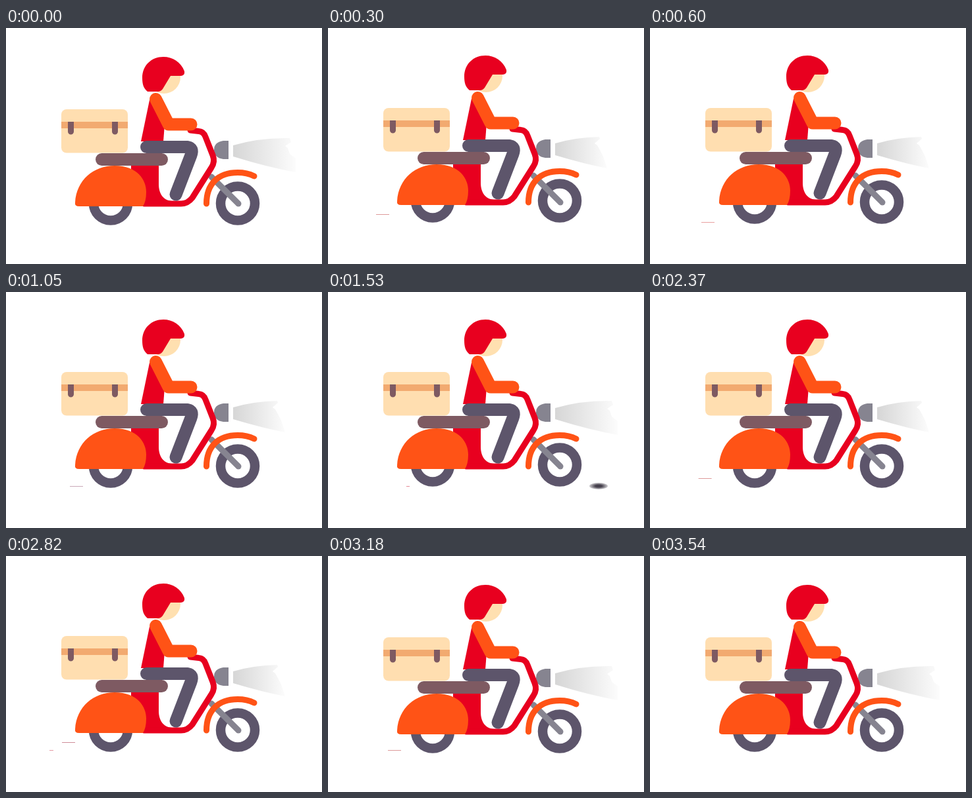
Write an HTML page that moves like this. It is 480x360 px and loops after 3.57 s.

```html
<!DOCTYPE html>
<html lang="en">
<head>
<meta charset="utf-8">
<title>Delivery scooter</title>
<style>
  html, body { margin: 0; width: 100%; height: 100%; overflow: hidden; background: #fff; }
  svg { display: block; width: 480px; height: 360px; }
  .red { fill: #e8001f; }
  .orange { fill: #ff5316; }
  .brown { fill: #7e5a62; }
  .grey { fill: #868490; }
  .line { fill: none; stroke-linecap: round; stroke-linejoin: round; }
</style>
</head>
<body>
<svg viewBox="0 0 480 360">
  <defs>
    <linearGradient id="glow">
      <stop stop-color="#d6d6d6"/><stop offset="1" stop-color="#fcfcfc"/>
    </linearGradient>
    <radialGradient id="shade">
      <stop offset=".35" stop-color="#45404c"/><stop offset="1" stop-color="#45404c" stop-opacity=".25"/>
    </radialGradient>
  </defs>
  <ellipse id="pothole" cy="296" rx="14" ry="5" fill="url(#shade)"/>
  <g id="streaks"></g>
  <g id="scooter">
    <g id="wheels" fill="#fff" stroke="#5d556b" stroke-width="14.5">
      <circle cx="159" cy="265.5" r="26"/><circle cx="352" cy="265.5" r="26"/>
    </g>
    <g id="body">
      <path id="beam" fill="url(#glow)"/>
      <path class="grey" d="M330 170H338V198H330Q316 196 316 184Q316 172 330 170Z"/>
      <path class="line" stroke="#868490" stroke-width="9" d="M312 225L353 266"/>
      <path class="line" stroke="#ff5316" stroke-width="9" d="M304.500 266C304.500 236 322 218.500 352 218.500Q366 218.500 377 224"/>
      <path class="red" d="M190 207H232V236C232 252 240 262 254 262H268V270H190Z"/>
      <path class="line" stroke="#e8001f" stroke-width="9" d="M280 154L293 155.500Q300 156 303 164L314 192Q318 202 312 211L283 257Q276 266 266 266H210"/>
      <path class="orange" d="M105 264C107 230 133 208 165 208C200 208 213 230 213 248Q213 262 208 270H111Q104 270 105 264Z"/>
      <circle cx="240" cy="73" r="25" fill="#ffe0b0"/>
      <path class="red" d="M215 95C209 90 207 84 207 74C207 55 221 42 239 42C253 42 266 50 271 64Q272 70 266 71H250L238 91Q235 95 231 95Z"/>
      <path class="red" d="M218 108L205 171H239L241 145L228 110Z"/>
      <path class="line" stroke="#5d556b" stroke-width="19" d="M213.500 179.500H276Q285 181 281 192L258 252"/>
      <path class="line" stroke="#ff5316" stroke-width="19" d="M227.500 106.500L247 145H281"/>
      <rect class="brown" x="136" y="189" width="110" height="19" rx="9.500"/>
      <g id="box">
        <rect x="84" y="122" width="101" height="66.500" rx="8" fill="#ffdeb0"/>
        <path fill="#f2aa70" d="M84 141h101v10h-101z"/>
        <path class="brown" d="M94 141h9v15a4.500 4.500 0 0 1-9 0zM161 141h9v15a4.500 4.500 0 0 1-9 0z"/>
      </g>
    </g>
  </g>
</svg>
<script>
const $ = id => document.getElementById(id);
const LOOP = 3570, STEP = 30;

// Suspension poses, 90 ms each: body drop, wheel drop, long beam
const poses = [[2, 2, 1], [0, 0, 0], [0, -2, 1], [0, -2, 0], [2, 0, 1]];
const beams = [
  'M345 176Q375 167 412 166L413 169L405 176L409 179L413 186L418 196L424 214Q388 207 345 194Z',
  'M345 177Q385 165 431 166L433 172L424 178L428 181L431 190L440 197V218Q396 210 345 194Z'
];

// Road streaks: start time, height, colour
const streaks = [
  [40, 284, '#d99'], [365, 296, '#e9a0a0'], [910, 296, '#c9a9b8'], [1100, 284, '#d99'],
  [1500, 296, '#e58a98'], [1605, 284, '#d99'], [1760, 278, '#e88'], [1900, 296, '#e07a80'],
  [2113, 284, '#d99'], [2455, 296, '#e59aa4'], [2620, 284, '#cf8c98'], [3010, 296, '#d99']
].map(([start, y, colour]) => {
  const path = document.createElementNS('http://www.w3.org/2000/svg', 'path');
  path.setAttribute('stroke', colour);
  $('streaks').append(path);
  return { start, y, path };
});

const set = (id, value, name = 'transform') => $(id).setAttribute(name, value);
const bump = (t, from, to) => t > from && t < to ? Math.sin(Math.PI * (t - from) / (to - from)) : 0;

function draw(now) {
  const t = Math.floor(now % LOOP / STEP) * STEP;
  const [drop, wheelDrop, long] = poses[Math.floor(t / 90) % poses.length];
  set('body', `translate(0 ${drop})`);
  set('wheels', `translate(0 ${wheelDrop})`);
  set('beam', beams[long], 'd');

  // The front dips into the pothole, then the rear kicks up and tosses the box
  const dip = bump(t, 1620, 1740), kick = bump(t, 1830, 1950), toss = bump(t, 1860, 2100);
  set('scooter', `rotate(${dip * 0.9} 159 265) rotate(${kick * 3} 352 265)`);
  set('box', `translate(0 ${-12 * toss}) rotate(${4 * toss} 134.5 155)`);

  const x = 411 - 0.7 * (t - 1530);
  set('pothole', x, 'cx');
  set('pothole', x > 54 && x < 494 ? 'visible' : 'hidden', 'visibility');

  for (const { start, y, path } of streaks) {
    const head = 125 - 0.2 * (t - start);
    const left = Math.max(66, head), right = Math.min(124, head + 20);
    path.setAttribute('d', right > left ? `M${left} ${y + 0.5}H${right}` : '');
  }
}

const origin = performance.now();
function tick() {
  draw(performance.now() - origin);
  requestAnimationFrame(tick);
}
tick();
</script>
</body>
</html>
```
